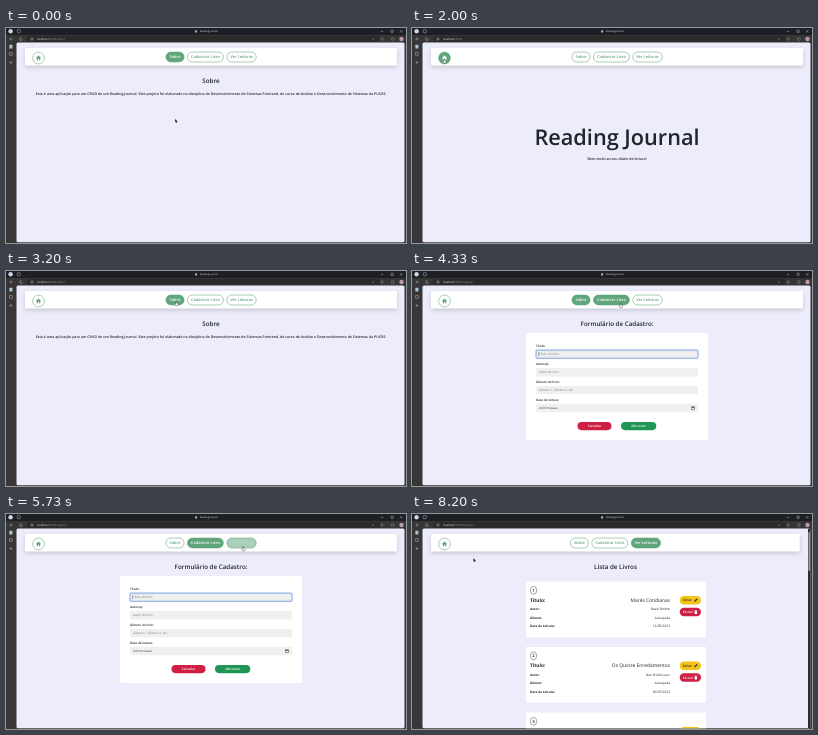
Write an HTML page with a canvas that moves like this. It is 400 by 215 pixels and loops after 8.27 s.

```html
<!DOCTYPE html>
<html lang="pt-BR">
<head>
<meta charset="utf-8">
<title>Reading Journal</title>
<style>
html, body { margin: 0; width: 100%; height: 100%; overflow: hidden; background: #edecfb; }
canvas { display: block; width: 400px; height: 215px; }
</style>
</head>
<body>
<canvas id="stage"></canvas>
<script>
const LOOP = 8270;
const GREEN = [96, 165, 123], WHITE = [255, 255, 255];
const INK = '#212529', RED = '#cf1f45';
const PAGE = { x: 10.5, y: 14.5, w: 388, h: 199.8 };
const canvas = document.getElementById('stage');
const ctx = canvas.getContext('2d');
const dpr = window.devicePixelRatio || 1;
canvas.width = 400 * dpr;
canvas.height = 215 * dpr;
ctx.scale(dpr, dpr);

const clamp = v => Math.max(0, Math.min(1, v));
const smooth = v => v * v * (3 - 2 * v);
const ramp = (t, start, length = 250) => smooth(clamp((t - start) / length));
const mix = (a, b, k) => `rgb(${a.map((v, i) => Math.round(v + (b[i] - v) * k))})`;
const BORDER = mix(GREEN, GREEN, 0);

function box(x, y, w, h, r, fill, stroke, line = 0.6) {
  ctx.beginPath();
  ctx.roundRect(x, y, w, h, r);
  paint(fill, stroke, line);
}

function disc(x, y, r, fill, stroke, line = 0.6) {
  ctx.beginPath();
  ctx.arc(x, y, r, 0, 7);
  paint(fill, stroke, line);
}

function poly(points, fill, stroke, line = 0.6, close = true) {
  ctx.beginPath();
  points.forEach(([x, y]) => ctx.lineTo(x, y));
  if (close) ctx.closePath();
  paint(fill, stroke, line);
}

function paint(fill, stroke, line) {
  if (fill) { ctx.fillStyle = fill; ctx.fill(); }
  if (stroke) { ctx.strokeStyle = stroke; ctx.lineWidth = line; ctx.stroke(); }
}

// y is the middle of the capital letters
function text(str, x, y, size, { weight = 400, color = INK, align = 'left' } = {}) {
  ctx.font = `${weight} ${size}px "Open Sans", "Noto Sans", sans-serif`;
  ctx.textRendering = 'geometricPrecision';
  ctx.textAlign = align;
  ctx.fillStyle = color;
  ctx.fillText(str, x, y + size * 0.357);
  return ctx.measureText(str).width;
}

function shadowed(color, blur, dy, draw) {
  ctx.save();
  ctx.shadowColor = color;
  ctx.shadowBlur = blur * dpr;
  ctx.shadowOffsetY = dy * dpr;
  draw();
  ctx.restore();
}

function browser(path) {
  const soft = '#b9b9b9';
  box(0, 0, 400, 215, 0, '#393736');
  box(0, 0, 400, 7, 0, '#1d1f24');
  box(0, 7, 400, 7.5, 0, '#363636');
  box(21, 8, 353, 5.8, 2.9, '#2a2a2a');

  disc(4.6, 3.2, 2.2, '#c9d6e6');
  box(11.3, 1.7, 3, 3, 0.6, null, soft, 0.5);
  box(189, 2.2, 2.2, 2.4, 0.4, '#a5a5a5');
  text('Reading Journal', 194, 3.4, 2.4, { color: '#e8e8e8' });
  poly([[375, 3.4], [377.4, 3.4]], null, soft, 0.5, false);
  box(385, 2.2, 2.2, 2.2, 0.2, null, soft, 0.5);
  poly([[394, 2.2], [396.4, 4.6]], null, soft, 0.5, false);
  poly([[396.4, 2.2], [394, 4.6]], null, soft, 0.5, false);

  poly([[5.2, 9.6], [3.8, 11], [5.2, 12.4]], null, soft, 0.5, false);
  poly([[3.8, 11], [6.8, 11]], null, soft, 0.5, false);
  ctx.beginPath();
  ctx.arc(15, 11, 1.4, 0, 5.2);
  paint(null, soft, 0.5);
  disc(26, 11, 1.2, null, soft, 0.5);
  const width = text('localhost', 31, 10.9, 2.85, { color: '#f0f0f0' });
  text(':3000' + path, 31 + width, 10.9, 2.85, { color: '#8f8f8f' });
  text('A', 367, 11, 2.6, { color: soft, align: 'center' });
  disc(376, 11, 1.2, null, '#8d8d8d', 0.5);
  box(385.5, 9.8, 2.6, 2.4, 0.4, null, '#8d8d8d', 0.5);
  disc(395.5, 11, 2.2, '#b99aa5');

  box(3.4, 16.8, 3, 3.6, 0.5, '#a9c4da');
  box(3.5, 24.5, 2.8, 2.8, 0.4, null, soft, 0.5);
  poly([[3.5, 34.5], [6.3, 34.5]], null, soft, 0.5, false);
  poly([[4.9, 33.1], [4.9, 35.9]], null, soft, 0.5, false);
  box(PAGE.x, PAGE.y, PAGE.w, PAGE.h, 1.5, '#edecfb');
}

function house(x, y, color) {
  poly([[x - 2.6, y], [x, y - 2.4], [x + 2.6, y], [x + 1.8, y], [x + 1.8, y + 2.2], [x + 0.5, y + 2.2],
    [x + 0.5, y + 0.8], [x - 0.5, y + 0.8], [x - 0.5, y + 2.2], [x - 1.8, y + 2.2], [x - 1.8, y]], color);
}

function pill(label, x, w, fill) {
  box(x, 24, w, 10, 5, mix(WHITE, GREEN, fill), BORDER, 0.55);
  text(label, x + w / 2, 29, 3.95, { weight: 600, color: mix(GREEN, WHITE, fill), align: 'center' });
}

function navbar(t, shift) {
  shadowed('rgba(0,0,0,.17)', 4, 1.7, () => box(19, 20, 372 + 2 * shift, 17.5, 1, '#fff'));
  const home = ramp(t, 870) - ramp(t, 2030);
  disc(32.5, 30, 5.9, mix(WHITE, GREEN, home), BORDER, 0.55);
  house(32.5, 30, mix(GREEN, WHITE, home));
  pill('Sobre', 159.9 + shift, 18.2, 1 - ramp(t, 1330, 200) + ramp(t, 2270) - ramp(t, 4330));
  pill('Cadastrar Livro', 181.4 + shift, 36, ramp(t, 3620) - ramp(t, 6130, 200));
  pill('Ver Leituras', 220.8 + shift, 29.4, ramp(t, 5600));
}

const heading = (str, x = 205) => text(str, x, 52.8, 6.25, { weight: 600, align: 'center' });

function aboutPage() {
  heading('Sobre');
  text('Esta é uma aplicação para um CRUD de um Reading Journal. Este projeto foi elaborado na disciplina ' +
    'de Desenvolvimento de Sistemas Frontend, do curso de Análise e Desenvolvimento de Sistemas da PUCRS.',
    205, 66, 3.54, { weight: 600, align: 'center' });
}

function homePage() {
  text('Reading Journal', 205, 109, 21.7, { weight: 600, align: 'center' });
  text('Bem vindo ao seu diário de leitura!', 205, 130.8, 3.52, { weight: 600, align: 'center' });
}

function calendar(x, y) {
  box(x - 1.5, y - 1.4, 3, 3, 0.3, null, '#333', 0.5);
  poly([[x - 1.5, y - 0.6], [x + 1.5, y - 0.6]], null, '#333', 0.7, false);
}

function formPage() {
  heading('Formulário de Cadastro:');
  box(114, 62, 182, 107, 1, '#fff');
  const fields = [
    ['Título:', 'Título do livro'],
    ['Autor(a):', 'Autor do livro'],
    ['Gênero do livro:', 'Gênero 1, Gênero 2, etc.'],
    ['Data de leitura:', 'dd/mm/aaaa']
  ];
  fields.forEach(([label, hint], i) => {
    const y = 75 + i * 17.9;
    text(label, 124, y, 3.1, { weight: 600 });
    box(124, y + 4.1, 162, 8.4, 1, '#f0f0f0');
    text(hint, 127, y + 8.3, 3.1, { color: i === 3 ? '#444' : '#777' });
  });
  shadowed('rgba(70,130,235,.5)', 1.2, 0, () => box(124, 79.1, 162, 8.2, 1, null, '#7a9fe0', 0.7));
  poly([[126.6, 81.4], [126.6, 85.2]], null, '#333', 0.4, false);
  calendar(281, 137);
  box(165.5, 151, 34, 8.2, 4.1, RED);
  box(209, 151, 35.3, 8.2, 4.1, '#1f9654');
  text('Cancelar', 182.5, 155, 3.25, { weight: 600, color: '#fff', align: 'center' });
  text('Adicionar', 226.6, 155, 3.25, { weight: 600, color: '#fff', align: 'center' });
}

function pencil(x, y) {
  poly([[x - 1.7, y + 1.7], [x - 1.3, y + 0.4], [x + 0.8, y - 1.7], [x + 1.7, y - 0.8], [x - 0.4, y + 1.3]], INK);
}

function trash(x, y) {
  box(x - 1.5, y - 1.6, 3, 0.6, 0, '#fff');
  box(x - 0.6, y - 2, 1.2, 0.5, 0, '#fff');
  box(x - 1.2, y - 0.7, 2.4, 2.6, 0.3, '#fff');
}

function bookCard(number, y, [title, author, genre, date]) {
  box(114, y, 180, 55.8, 1, '#fff');
  box(118.5, y + 4.9, 6, 7.8, 3, '#fff', INK, 0.4);
  text(number, 121.5, y + 8.8, 4.4, { weight: 600, align: 'center' });
  text('Título:', 118, y + 18.7, 4.8, { weight: 700 });
  text(title, 258, y + 18.7, 4.9, { align: 'right' });
  [['Autor:', author], ['Gênero:', genre], ['Data de Leitura:', date]].forEach(([label, value], i) => {
    const row = y + 27.7 + i * 8.4;
    text(label, 118, row, 3.1, { weight: 700 });
    text(value, 258, row, 3.25, { align: 'right' });
  });
  box(267.7, y + 14.6, 21.3, 8.4, 4.2, '#f4c21a');
  text('Editar', 270.8, y + 18.7, 3.2, { weight: 600 });
  pencil(283.8, y + 18.8);
  box(267.7, y + 26.3, 21.3, 8.4, 4.2, RED);
  text('Excluir', 270.8, y + 30.4, 3.2, { weight: 600, color: '#fff' });
  trash(283.8, y + 30.5);
}

const books = [
  ['Marés Cotidianas', 'Ravel Ondim', 'Autoajuda', '12/05/2023'],
  ['Os Quinze Enredamentos', 'Don Ovídio Lurz', 'Autoajuda', '20/07/2023'],
  ['', '', '', '']
];

function listPage() {
  heading('Lista de Livros', 203.5);
  ctx.save();
  ctx.beginPath();
  ctx.rect(PAGE.x, PAGE.y, PAGE.w, PAGE.h);
  ctx.clip();
  books.forEach((book, i) => bookCard(i + 1, 67.5 + i * 65.5, book));
  box(396, PAGE.y, 3, PAGE.h, 0, '#2c2c2c');
  box(396.4, 18, 1.7, 39, 0.8, '#9a9a9a');
  ctx.restore();
}

const routes = [
  { from: 0, path: '/about', draw: aboutPage },
  { from: 1330, path: '', draw: homePage },
  { from: 3000, path: '/about', draw: aboutPage },
  { from: 4330, path: '/register', draw: formPage },
  { from: 6130, path: '/booklist', draw: listPage, shift: -1.6 }
];

// start, end, target x, target y
const moves = [
  [0, 0, 169.3, 91.2],
  [60, 860, 32, 31],
  [2000, 2480, 170, 30.6],
  [3460, 3900, 208.6, 32.4],
  [5260, 5730, 237, 32.6],
  [6060, 6130, 239, 32.6],
  [6730, 6800, 239.6, 32.4],
  [7130, 7930, 60.6, 45.4],
  [8000, 8200, 61.6, 44.4]
];

function pointerAt(t) {
  let [x, y] = moves[0].slice(2);
  for (const [start, end, toX, toY] of moves.slice(1)) {
    const k = ramp(t, start, end - start);
    x += (toX - x) * k;
    y += (toY - y) * k;
  }
  return [x, y];
}

function pointer(t, shift) {
  const [x, y] = pointerAt(t);
  const overHome = Math.hypot(x - 32.5, y - 30) < 6;
  const overLink = y > 24 && y < 34 &&
    [[160, 178], [181, 217], [221, 250]].some(([a, b]) => x > a + shift && x < b + shift);
  ctx.save();
  ctx.translate(x, y);
  ctx.scale(0.85, 0.85);
  ctx.lineJoin = 'round';
  if (overHome || overLink) {
    poly([[-0.5, 0], [0.4, 0], [0.5, 1.6], [2.2, 2], [2.4, 3.3], [1.8, 5], [-0.6, 5], [-1.8, 3.1], [-1.3, 2.6], [-0.5, 3]],
      '#fff', '#222', 0.45);
  } else {
    poly([[0, 0], [0, 3.6], [0.8, 2.9], [1.4, 4.3], [2, 4], [1.4, 2.7], [2.5, 2.6]], '#111', '#111', 0.2);
  }
  ctx.restore();
}

function render(t) {
  const route = routes.filter(r => r.from <= t).pop();
  const shift = route.shift || 0;
  browser(route.path);
  navbar(t, shift);
  route.draw();
  pointer(t, shift);
}

const began = performance.now();
function tick() {
  render((performance.now() - began) % LOOP);
  requestAnimationFrame(tick);
}
tick();
</script>
</body>
</html>
```
